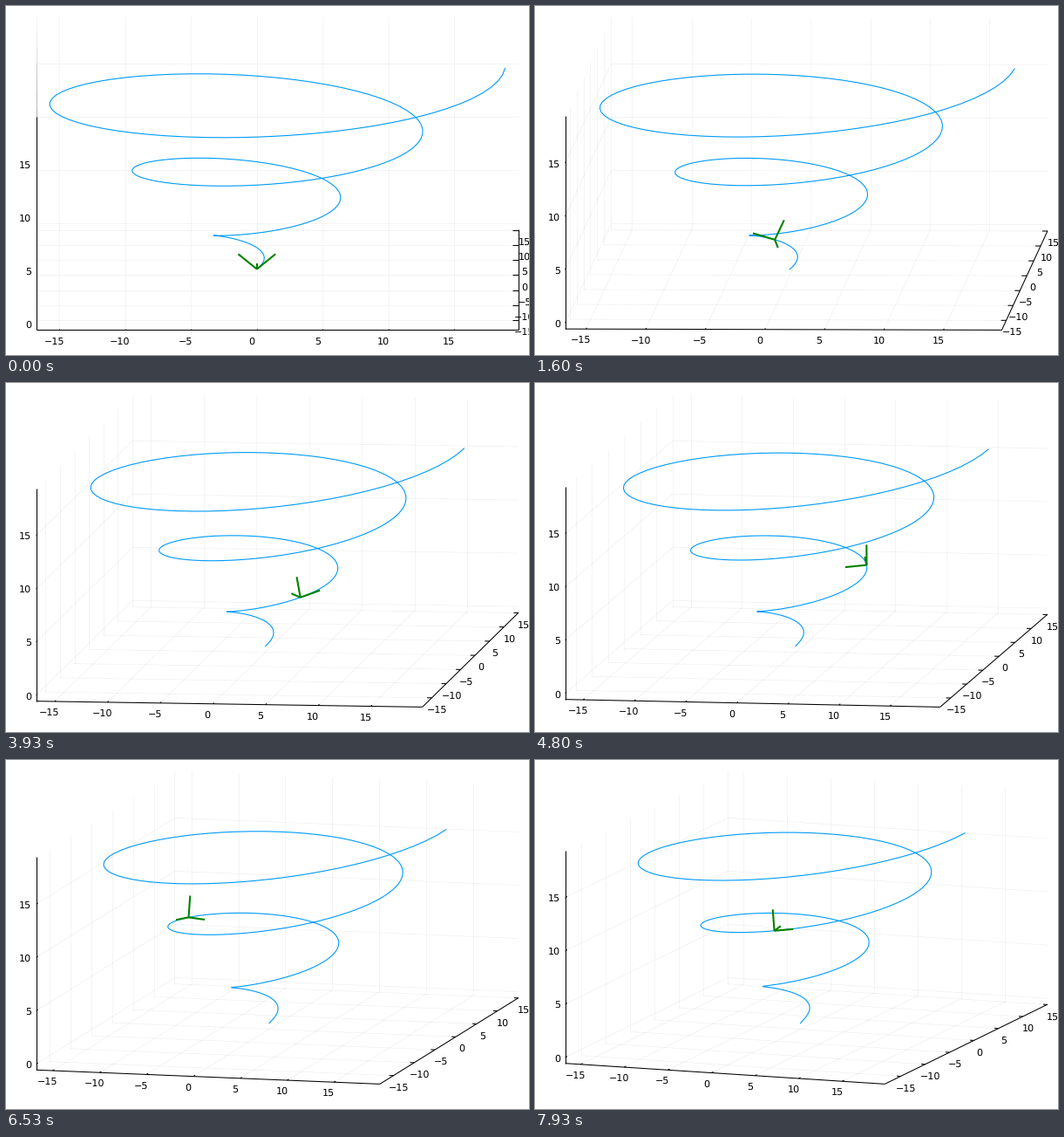
Recreate the animation shown at these times as a matplotlib script. Size 600 by 400 pixels, loop 8 s.

```python
import numpy as np
import matplotlib.pyplot as plt
from matplotlib.animation import FuncAnimation
from matplotlib.collections import LineCollection

plt.rcParams["font.family"] = "DejaVu Sans"
plt.rcParams["text.hinting"] = "none"

W, H = 600, 400
LEFT, RIGHT, TOP, BOTTOM = 34.7, 588.1, 12.4, 371.4
TICKS, TICK_MS = 400, 20  # the pose advances 15 times a second
POINTS = 200
DEPTH = 0.3205 * (BOTTOM - TOP)
HEIGHT = BOTTOM - TOP - DEPTH
ARM = 2
TICK = 0.012


def spiral(t):
    return np.stack([t * np.cos(t), t * np.sin(t), t], axis=-1)


def frenet(t):
    """Unit tangent, normal and binormal of the spiral."""
    c, s = np.cos(t), np.sin(t)
    d1 = np.array([c - t * s, s + t * c, 1.0])
    d2 = np.array([-2 * s - t * c, 2 * c - t * s, 0.0])
    tangent = d1 / np.linalg.norm(d1)
    binormal = np.cross(d1, d2)
    binormal /= np.linalg.norm(binormal)
    return tangent, np.cross(binormal, tangent), binormal


ts = np.linspace(0, 6 * np.pi, POINTS)
curve = spiral(ts)
lo, hi = curve.min(axis=0), curve.max(axis=0)
pad = 0.03 * (hi - lo)
lo, hi = lo - pad, hi + pad


def to_unit(p):
    return (np.asarray(p) - lo) / (hi - lo)


def project(u, angle):
    """Unit-cube coordinates to stage pixels, box always filling the stage."""
    u = np.asarray(u, dtype=float)
    c, s = np.cos(angle), np.sin(angle)
    x, y, z = u[..., 0], u[..., 1], u[..., 2]
    px = LEFT + (RIGHT - LEFT) * (c * x + s * y) / (c + s)
    py = BOTTOM - DEPTH * (s * s * (1 - x) + c * c * y) - HEIGHT * z
    return np.stack([px, py], axis=-1)


tick_values = [range(-15, 16, 5), range(-15, 16, 5), range(0, 16, 5)]
xs, ys, zs = [(np.array(v) - lo[i]) / (hi - lo)[i]
              for i, v in enumerate(tick_values)]

grid = []
for x in xs:
    grid += [[(x, 0, 0), (x, 1, 0)], [(x, 1, 0), (x, 1, 1)]]
for y in ys:
    grid += [[(0, y, 0), (1, y, 0)], [(0, y, 0), (0, y, 1)]]
for z in zs:
    grid += [[(0, 1, z), (1, 1, z)], [(0, 0, z), (0, 1, z)]]

frame = [[(0, 0, 0), (1, 0, 0)], [(1, 0, 0), (1, 1, 0)], [(0, 0, 0), (0, 0, 1)]]
frame += [[(x, 0, 0), (x, TICK, 0)] for x in xs]
frame += [[(1, y, 0), (1 - TICK, y, 0)] for y in ys]
frame += [[(0, 0, z), (0, TICK, z)] for z in zs]

fig = plt.figure(figsize=(W / 100, H / 100), dpi=100, facecolor="white")
ax = fig.add_axes([0, 0, 1, 1])
ax.set_xlim(0, W)
ax.set_ylim(H, 0)
ax.axis("off")

grid_lines = ax.add_collection(
    LineCollection([], colors="black", linewidths=0.4, alpha=0.08))
frame_lines = ax.add_collection(
    LineCollection([], colors="black", linewidths=0.75, capstyle="butt"))
path, = ax.plot([], [], color="#009AF9", lw=0.8)
arms = ax.add_collection(
    LineCollection([], colors="#008000", linewidths=1.5, capstyle="butt"))

# Each label: text artist, anchor in the unit cube, pixel offset to its baseline
labels = []


def add_labels(values, anchors, dx, dy, align):
    for v, anchor in zip(values, anchors):
        text = ax.text(0, 0, str(v).replace("-", "\u2212"), fontsize=8,
                       ha=align, va="baseline", color="black")
        labels.append((text, anchor, (dx, dy)))


add_labels(tick_values[0], [(x, 0, 0) for x in xs], -6, 16, "center")
add_labels(tick_values[1], [(1, y, 0) for y in ys], 6.5, 17, "center")
add_labels(tick_values[2], [(0, 0, z) for z in zs], -5.5, 4.6, "right")


def draw(tick):
    k = (3 * tick + 2) // 10
    angle = np.radians(round(45 * (k + 1) / POINTS))
    grid_lines.set_segments(project(grid, angle))
    frame_lines.set_segments(project(frame, angle))
    path.set_data(*project(to_unit(curve), angle).T)

    origin = curve[k]
    ends = [[origin, origin + ARM * v] for v in frenet(ts[k])]
    arms.set_segments(project(to_unit(ends), angle))

    for text, anchor, offset in labels:
        text.set_position(project(anchor, angle) + offset)
    return [grid_lines, frame_lines, path, arms] + [t for t, _, _ in labels]


anim = FuncAnimation(fig, draw, frames=TICKS, init_func=lambda: draw(0),
                     interval=TICK_MS, repeat=True, repeat_delay=0)
plt.show()
```
